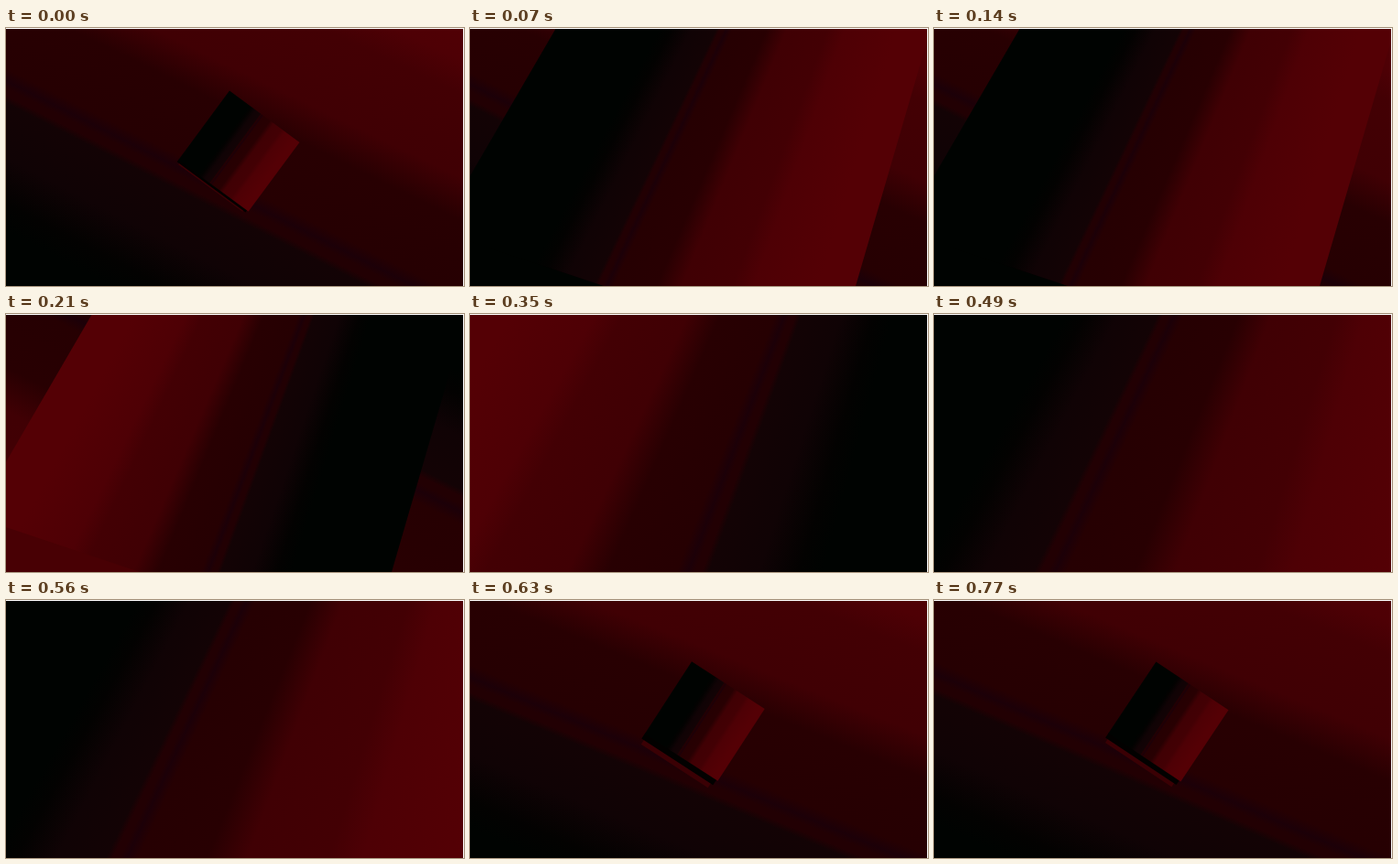
Write an HTML page with a canvas that moves like this. It is 500 px wide and 282 px high and loops after 840 ms.

```html
<!DOCTYPE html>
<html lang="en">
<head>
<meta charset="utf-8">
<title>Red cube</title>
<style>
  html, body { margin: 0; width: 100%; height: 100%; overflow: hidden; background: #fff; }
  canvas { display: block; }
</style>
</head>
<body>
<canvas id="stage" width="500" height="282"></canvas>
<script>
const ctx = document.getElementById('stage').getContext('2d');
const TICK = 70, TICKS = 12, SHOT = 4, WIDTH = 499, HEIGHT = 282, MIDDLE = 141;

// Colours along a surface, measured in band widths from the thin double line.
const BANDS = [
  [-1.1, '#000301'], [-0.9, '#030201'], [-0.55, '#100305'], [-0.12, '#130305'],
  [-0.06, '#220003'], [0, '#220003'], [0.06, '#1c0008'], [0.16, '#260002'],
  [0.75, '#280002'], [1.1, '#400004'], [1.8, '#430004'], [2.1, '#4e0005'], [3, '#540005']
];
const FIRST = BANDS[0][0], SPAN = BANDS.at(-1)[0] - FIRST;

// The line crosses height y at x and drifts left by slope per row; fan widens
// the bands towards the bottom, and a negative width reverses their order.
function paintBands({ x, y = MIDDLE, width, slope, fan = 0 }) {
  for (let row = 1; row < HEIGHT; row++) {
    const line = x - slope * (row - y);
    const w = width * (1 + fan * (row - MIDDLE) / HEIGHT);
    const start = line + FIRST * w;
    const gradient = ctx.createLinearGradient(start, 0, start + SPAN * w, 0);
    for (const [u, colour] of BANDS) gradient.addColorStop((u - FIRST) / SPAN, colour);
    ctx.fillStyle = gradient;
    ctx.fillRect(0, row, WIDTH, 1);
  }
}

function trace(...points) {
  ctx.beginPath();
  for (const [x, y] of points) ctx.lineTo(x, y);
  ctx.closePath();
}

function paintFace(sign, width) {
  paintBands({ x: 244 - sign * 0.47 * width, width: sign * width, slope: 0.42 + 0.05 * sign, fan: 0.22 });
}

function drawFar(step) {
  const turn = (step / 3) ** 4;
  paintBands({ x: 117 + 33 * turn, width: 330 - 56 * turn, slope: 0.41 * turn - 2.39, fan: 0.08 });

  const x = 256 - 2 * turn, y = 133 + 2 * turn, half = 47.5;
  const angle = (33 + 3.4 * turn) * Math.PI / 180;
  const rim = 5.5 - 4 * turn;
  ctx.translate(x, y);
  ctx.rotate(angle);
  ctx.fillStyle = '#3a0004';
  ctx.fillRect(-half + 3, half, 2 * half - 8, 2 * rim);
  ctx.fillStyle = '#020100';
  ctx.fillRect(-half, half - 2, 2 * half - 2, rim + 2);
  ctx.beginPath();
  ctx.rect(-half, -half, 2 * half, 2 * half - 1);
  ctx.setTransform(1, 0, 0, 1, 0, 0);
  ctx.clip();
  paintBands({ x: x - 5, y, width: 15 / Math.cos(angle), slope: Math.tan(angle) });
}

function drawNear(sign) {
  paintBands({ x: 254 - sign * 110, width: sign * 270, slope: -2, fan: 0.1 });
  trace([94, 0], [503, 0], [421, HEIGHT], [-70, HEIGHT]);
  ctx.clip();
  paintFace(sign, 71);
  trace([0, 233], [146, HEIGHT], [0, HEIGHT]);
  ctx.fillStyle = sign > 0 ? '#000301' : '#480004';
  ctx.fill();
}

function draw(tick) {
  const since = (tick + TICKS - 1) % TICKS;
  const shot = Math.floor(since / SHOT);
  const sign = tick >= 3 && tick < 7 ? -1 : 1;
  ctx.clearRect(0, 0, 500, HEIGHT);
  ctx.save();
  ctx.beginPath();
  ctx.rect(0, 1, WIDTH, HEIGHT - 1);
  ctx.clip();
  if (shot === 0) drawNear(sign);
  else if (shot === 1) paintFace(sign, 114);
  else drawFar(since % SHOT);
  ctx.restore();
}

let shown = -1;
function loop() {
  const tick = Math.floor(performance.now() / TICK) % TICKS;
  if (tick !== shown) draw(shown = tick);
  requestAnimationFrame(loop);
}
loop();
</script>
</body>
</html>
```
